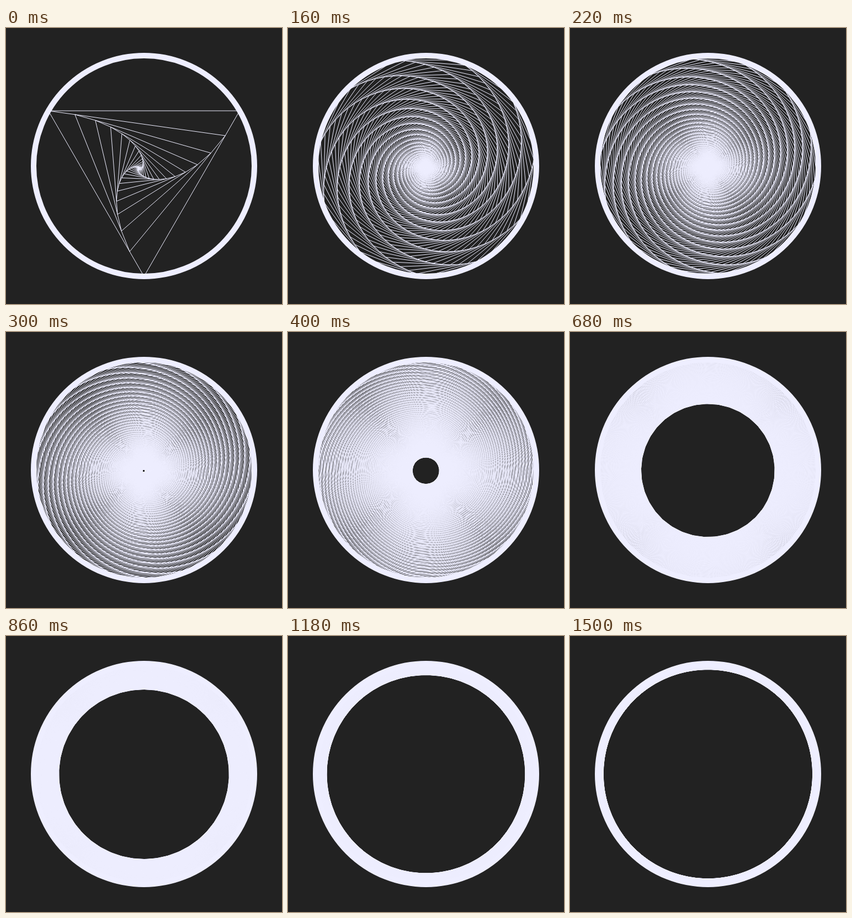
These frames come from a looping animation (500 px wide and 500 px high, 1.52 s). An HTML page with a canvas:

```html
<!DOCTYPE html>
<html lang="en">
<head>
<meta charset="utf-8">
<title>Spiral polygons</title>
<style>
  html, body { margin: 0; width: 100%; height: 100%; overflow: hidden; background: #222; }
  canvas { display: block; }
</style>
</head>
<body>
<canvas id="stage" width="500" height="500"></canvas>
<script>
const SIZE = 500, CENTER = SIZE / 2, RADIUS = 200;
const STEP_MS = 20, STEPS = 76;
const POINTS = 10000, PULL = 0.15;
const DARK = '#222', LIGHT = '#eef';

const getContext = canvas => canvas.getContext('2d', { willReadFrequently: true });
const stage = getContext(document.getElementById('stage'));
const cache = [];

// A flat-topped polygon, closed, then each new point lies on an earlier side.
function spiral(sides) {
  const points = [];
  for (let i = 0; i <= sides; i++) {
    const angle = -Math.PI / 2 + (2 * i - 1) * Math.PI / sides;
    points.push([CENTER + RADIUS * Math.cos(angle), CENTER + RADIUS * Math.sin(angle)]);
  }
  while (points.length < POINTS) {
    const k = points.length - sides;
    const [ax, ay] = points[k], [bx, by] = points[k + 1];
    if (Math.hypot(bx - ax, by - ay) < 0.02) break;
    points.push([ax + (bx - ax) * PULL, ay + (by - ay) * PULL]);
  }
  return points;
}

function render(sides) {
  const canvas = document.createElement('canvas');
  canvas.width = canvas.height = SIZE;
  const ctx = getContext(canvas);
  ctx.fillStyle = DARK;
  ctx.fillRect(0, 0, SIZE, SIZE);
  ctx.strokeStyle = LIGHT;
  ctx.lineWidth = 1;

  // Separate strokes let the soft edges of neighbouring lines add up.
  const points = spiral(sides);
  for (let i = 1; i < points.length; i++) {
    ctx.beginPath();
    ctx.moveTo(...points[i - 1]);
    ctx.lineTo(...points[i]);
    ctx.stroke();
  }

  ctx.lineWidth = 10;
  ctx.beginPath();
  ctx.arc(CENTER, CENTER, RADIUS, 0, 2 * Math.PI);
  ctx.stroke();
  return canvas;
}

let shown = -1;
function draw() {
  const step = Math.floor(performance.now() / STEP_MS) % STEPS;
  if (step !== shown) {
    cache[step] ||= render(step + 3);
    stage.drawImage(cache[step], 0, 0);
    shown = step;
  }
  requestAnimationFrame(draw);
}
draw();
</script>
</body>
</html>
```
